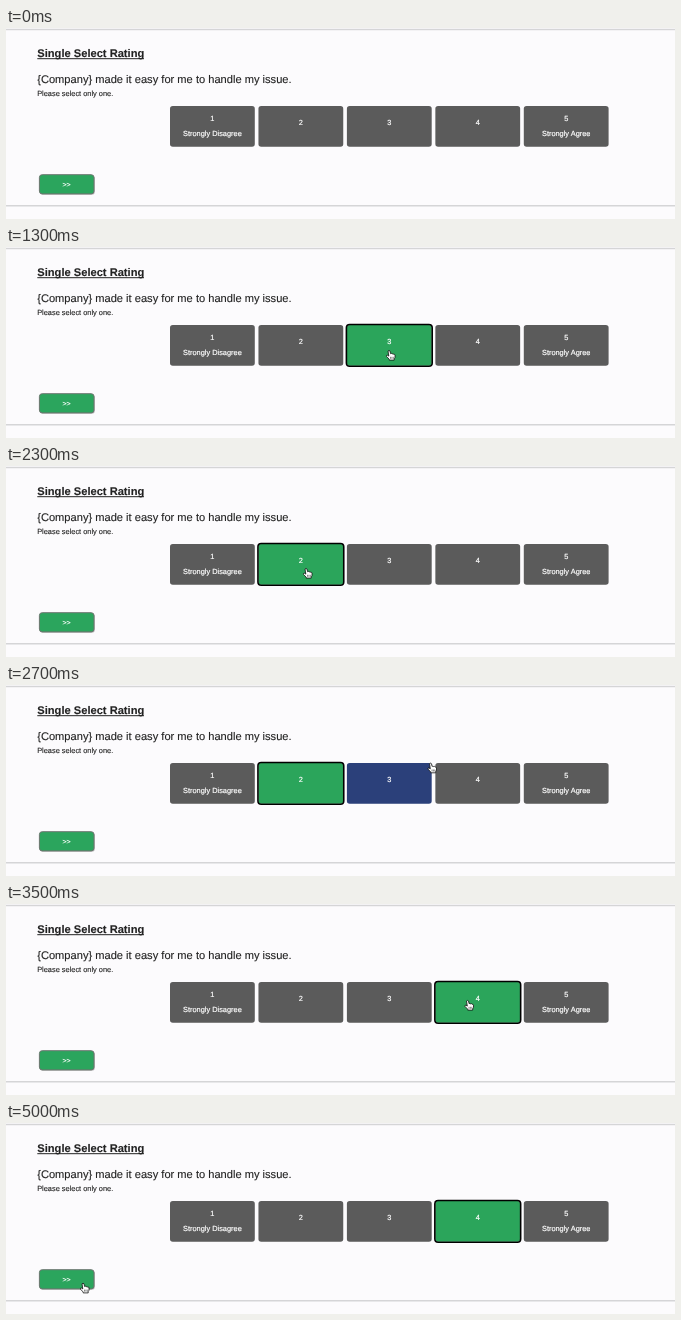
Recreate the animation shown at these times as an HTML page. Size 669 by 191 pixels, loop 5.1 s.

```html
<!DOCTYPE html>
<html lang="en">
<head>
<meta charset="utf-8">
<title>Single Select Rating</title>
<style>
  html, body { margin: 0; width: 100%; height: 100%; overflow: hidden; background: #fcfbfd; }
  svg { display: block; font-family: "Liberation Sans", Arial, sans-serif; font-size: 7.4px; text-rendering: geometricPrecision; }
  .dark { fill: #222; stroke: #222; stroke-width: .12; }
  .light { fill: #fff; stroke: #fff; stroke-width: .2; text-anchor: middle; }
  .ring { fill: none; stroke: #000; stroke-width: 1.6; }
</style>
</head>
<body>
<svg width="669" height="191" viewBox="0 0 669 191">
  <path d="M0 1.5H669M0 177.8H669" stroke="#d5d5d7" stroke-width="1.5"/>
  <g class="dark">
    <text x="31.3" y="29.3" font-size="11.13" font-weight="bold">Single Select Rating</text>
    <path d="M31.3 30.7H138" stroke-width="1"/>
    <text x="31.2" y="55.2" font-size="11.12">{Company} made it easy for me to handle my issue.</text>
    <text x="31.2" y="67.6">Please select only one.</text>
  </g>
  <g id="options"></g>
  <rect x="33.8" y="147.4" width="55" height="19.4" rx="3" fill="#888" opacity=".6"/>
  <rect x="33.4" y="146.7" width="54.6" height="19.2" rx="2.8" fill="#2ba55d" stroke="#6c756f"/>
  <text class="light" x="60.6" y="158.5" font-size="7">&gt;&gt;</text>
  <g id="cursor" stroke-linejoin="round">
    <path id="arrow" d="M0 0V9L2.1 7.2L3.5 10.3L5 9.6L3.6 6.7H6.2Z" fill="#000" stroke="#fff" stroke-width=".7"/>
    <g id="hand" stroke="#111" stroke-width=".8">
      <path d="M-1 0Q0-1.1 1 0L1.6 2.7Q2.5 2 3.2 2.9Q4.1 2.3 4.7 3.3Q5.8 3 6 4.1V6.4L5.2 7.8V9.1H.2V8.2L-2.5 5.4Q-2.9 4.1-1.6 4.2L-.2 5.1Z" fill="#fff"/>
      <path d="M1.5 5.8V7.8M2.9 5.8V7.8M4.3 5.8V7.8" stroke-width=".5"/>
    </g>
  </g>
</svg>
<script>
const LOOP = 5100, STEP = 100;
const GREY = '#5b5b5b', BLUE = '#2b407a', GREEN = '#2ba55b';
const TOP = 78, WIDTH = 84.8, HEIGHT = 40.8;
const optionX = i => 164 + 88.45 * i;
const byId = id => document.getElementById(id);

// Where the pointer rests or turns; lift bows the way there upwards
const stops = [
  { t: 300, x: 384, y: 152 },
  { t: 500, x: 382.5, y: 119 },
  { t: 600, x: 382.5, y: 119 },
  { t: 1200, x: 383, y: 104 },
  { t: 1300, x: 383, y: 104 },
  { t: 1700, x: 302, y: 102.5 },
  { t: 2300, x: 300, y: 103 },
  { t: 2700, x: 424.5, y: 78.7 },
  { t: 3100, x: 461.5, y: 97 },
  { t: 3600, x: 461.5, y: 97 },
  { t: 4100, x: 85, y: 127, lift: 44 },
  { t: 4500, x: 77, y: 160.8 }
];

// Each click picks an option, which keeps its focus ring until blur
const clicks = [
  { t: 1300, option: 2, blur: 2300 },
  { t: 2300, option: 1, blur: 3200 },
  { t: 3400, option: 3, blur: LOOP }
];

byId('options').innerHTML = [0, 1, 2, 3, 4].map(i => {
  const x = optionX(i), mid = x + WIDTH / 2;
  const label = { 0: 'Strongly Disagree', 4: 'Strongly Agree' }[i];
  return `<g>
    <rect x="${x}" y="${TOP}" width="${WIDTH}" height="${HEIGHT}" rx="2.8"/>
    <rect class="ring" x="${x - .5}" y="${TOP - .5}" width="${WIDTH + 1}" height="${HEIGHT + 1}" rx="3.3"/>
    <text class="light" x="${mid}" y="${label ? 93.4 : 97}">${i + 1}</text>
    ${label ? `<text class="light" x="${mid}" y="108.2">${label}</text>` : ''}
  </g>`;
}).join('');
const options = [...byId('options').children];

function pointerAt(t) {
  const to = stops.find(s => s.t > t) || stops.at(-1);
  const from = stops[Math.max(0, stops.indexOf(to) - 1)];
  const k = Math.min(1, Math.max(0, (t - from.t) / (to.t - from.t || 1)));
  const ease = k * k * (3 - 2 * k);
  const bow = (to.lift || 0) * Math.sin(Math.PI * ease);
  return [from.x + (to.x - from.x) * ease, from.y + (to.y - from.y) * ease - bow];
}

const inside = (x, y, left, top, w, h) => x >= left && x <= left + w && y >= top && y <= top + h;
const show = (el, on) => el.setAttribute('visibility', on ? 'visible' : 'hidden');

function draw(now) {
  const t = Math.floor(now % LOOP / STEP) * STEP;
  const [x, y] = pointerAt(t);
  const visible = t >= stops[0].t;
  const click = clicks.findLast(c => c.t <= t);
  let pointing = inside(x, y, 33, 146.5, 55.5, 20);

  options.forEach((el, i) => {
    const hover = visible && inside(x, y, optionX(i), TOP, WIDTH, HEIGHT);
    const chosen = click?.option === i;
    pointing ||= hover;
    el.children[0].setAttribute('fill', chosen ? GREEN : hover ? BLUE : GREY);
    show(el.children[1], chosen && t < click.blur);
  });

  byId('cursor').setAttribute('transform', `translate(${x} ${y})`);
  show(byId('hand'), visible && pointing);
  show(byId('arrow'), visible && !pointing);
}

const start = performance.now();
function tick() {
  draw(performance.now() - start);
  requestAnimationFrame(tick);
}
tick();
</script>
</body>
</html>
```
